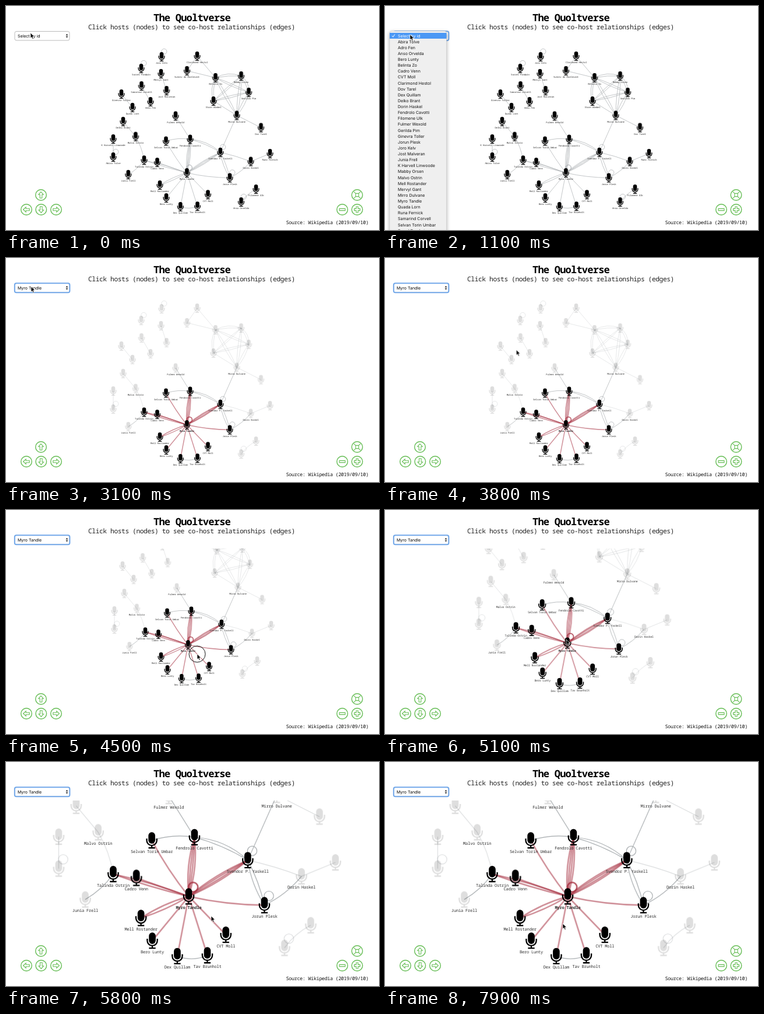
An HTML page that plays this animation: 640 px wide and 384 px high, repeating every 8 s.

```html
<!DOCTYPE html>
<html lang="en">
<head>
<meta charset="utf-8">
<title>The Quoltverse</title>
<style>
html, body { margin: 0; height: 100%; overflow: hidden; background: #fff; }
svg { display: block; width: 100vw; height: 100vh; }
text { text-rendering: geometricPrecision; }
.mono { font-family: "Noto Sans Mono", monospace; }
.ui { font: 7px Inter, sans-serif; }

.far, .far-edge, .far-label, .red, .chosen, .menu, .slide, .ring, .before, .after, .cursor, .press {
  animation: 8s step-end infinite;
}

/* graph */
.edge { fill: none; stroke: #a3a8ab; stroke-width: .65; }
.label { font-size: 4px; letter-spacing: -.13px; text-anchor: middle; fill: #303030; }
.far { animation-name: fade; --to: .13; }
.far-edge { animation-name: fade; --to: .4; }
.far-label { animation-name: fade; --to: 0; }
.red { animation-name: redden; }
.chosen { animation-name: bolden; }
@keyframes fade { 0% { opacity: 1 } 35%, 100% { opacity: var(--to) } }
@keyframes redden {
  0% { stroke: #a3a8ab; stroke-width: .65 }
  35%, 100% { stroke: rgba(165, 45, 62, .53); stroke-width: 1.45 }
}
@keyframes bolden { 0% { font-weight: 400 } 35%, 100% { font-weight: 700 } }
.view { transform-box: view-box; transform-origin: 310.4px 286px; animation: view 8s linear infinite; }
@keyframes view {
  0%, 51.25% { transform: translate(0, 0) scale(1) }
  56.25%, 59.4% { transform: translate(2px, -55px) scale(1) }
  63.75% { transform: translate(2.4px, -58px) scale(1.2) }
  68.75%, 100% { transform: translate(3.1px, -55.6px) scale(1.765) }
}

/* select and menu */
.ring { animation-name: show; fill: none; stroke: #74a9ea; stroke-width: 2; }
@keyframes show { 0% { opacity: 0 } 12.5%, 100% { opacity: 1 } }
.before { animation-name: before; }
.after { animation-name: after; }
@keyframes before { 0% { opacity: 1 } 33.75%, 100% { opacity: 0 } }
@keyframes after { 0% { opacity: 0 } 33.75%, 100% { opacity: 1 } }
.menu { animation-name: menu; }
@keyframes menu {
  0% { opacity: 0 }
  12.5% { opacity: 1 }
  33.75% { opacity: 1; animation-timing-function: linear }
  35.5%, 100% { opacity: 0 }
}
.panel { fill: #efefef; stroke: #c4c4c4; stroke-width: .5; filter: drop-shadow(0 2px 3px #0005); }
.slide { animation-name: slide; --dir: 1; }
.back { --dir: -1; }
@keyframes slide {
  0% { transform: translateY(0) }
  18.75% { transform: translateY(calc(var(--dir) * 10.125px)) }
  22.5% { transform: translateY(calc(var(--dir) * 10.125px)); animation-timing-function: steps(27) }
  31%, 100% { transform: translateY(calc(var(--dir) * 283.5px)) }
}

/* pointer */
.cursor { animation-name: move; animation-timing-function: linear; }
@keyframes move {
  0%, 5% { transform: translate(42px, 46px) }
  7.5%, 43.75% { transform: translate(43px, 49px) }
  47.5% { transform: translate(225px, 157px) }
  51.25% { transform: translate(326px, 302px) }
  56.25%, 57.5% { transform: translate(328px, 247px) }
  62%, 68.75% { transform: translate(311px, 222px) }
  72.5%, 77.5% { transform: translate(352px, 264px) }
  85%, 87.5% { transform: translate(330px, 250px) }
  96.25%, 98.7% { transform: translate(245px, 230px) }
  98.75%, 100% { transform: translate(305px, 277px) }
}
.press { animation-name: press; fill: none; stroke: #111; }
@keyframes press { 0% { opacity: 0 } 51.25% { opacity: 1 } 57.5%, 100% { opacity: 0 } }
</style>
</head>
<body>
<svg viewBox="0 0 640 384">
  <defs>
    <clipPath id="canvas"><rect y="66" width="640" height="318"/></clipPath>
    <clipPath id="row"><rect x="8" y="46" width="97.5" height="10"/></clipPath>
    <g id="mic">
      <rect x="-3.3" y="-8" width="6.6" height="11.2" rx="3.3"/>
      <path d="M-4.9-1.8V0A4.9 4.9 0 0 0 4.9 0V-1.8M0 5V7M-3.2 7.3H3.2" fill="none" stroke="#000" stroke-width="1.3"/>
    </g>
    <path id="arrow" d="M0-5.4L4.2-.8H1.8V5.2H-1.8V-.8H-4.2Z"/>
    <path id="minus" d="M-5-1.6H5V1.6H-5Z"/>
    <path id="plus" d="M-1.6-5h3.2v3.4h3.4v3.2h-3.4v3.4h-3.2v-3.4h-3.4v-3.2h3.4z"/>
    <path id="extent" d="M-2.6-2.6H2.6V2.6H-2.6ZM-2.6-2.6L-5.6-5.6M2.6-2.6L5.6-5.6M2.6 2.6L5.6 5.6M-2.6 2.6L-5.6 5.6"/>
    <g id="list"><path d="M12 51l1.8 2.2 3-4.6" fill="none" stroke="currentColor"/></g>
  </defs>

  <g clip-path="url(#canvas)"><g class="view mono" id="graph"></g></g>
  <g id="buttons" fill="#fff" stroke="#66bd55" stroke-width="1.1"></g>

  <g class="mono" fill="#000">
    <text x="319" y="26" font-size="17" font-weight="700" letter-spacing="-.77" text-anchor="middle">The Quoltverse</text>
    <text x="318.5" y="40" font-size="11.3" letter-spacing="-.44" text-anchor="middle" fill="#222">Click hosts (nodes) to see co-host relationships (edges)</text>
    <text x="622" y="373.5" font-size="8.4" letter-spacing="-.31" text-anchor="end" fill="#111">Source: Wikipedia (2019/09/10)</text>
  </g>

  <g class="ui">
    <rect x="15" y="43.5" width="94" height="15.5" rx="3" fill="#fff" stroke="#aaa" stroke-width=".8"/>
    <rect class="ring" x="14.8" y="43.3" width="94.6" height="16" rx="3"/>
    <text class="before" x="20" y="53.7">Select by id</text>
    <text class="after" x="20" y="53.7">Myro Tandle</text>
    <path d="M102.6 50.4l1.9-2.6 1.9 2.6zM102.6 52l1.9 2.6 1.9-2.6z" fill="#222"/>
  </g>

  <g class="menu ui">
    <rect class="panel" x="8" y="43" width="97.5" height="400" rx="3.5"/>
    <use href="#list" color="#111" fill="#111"/>
    <g class="slide"><g clip-path="url(#row)">
      <rect x="8" y="46" width="97.5" height="10" fill="#4b98f5"/>
      <g class="slide back"><use href="#list" color="#fff" fill="#fff"/></g>
    </g></g>
  </g>

  <g class="cursor">
    <circle class="press" r="14"/>
    <path d="M0 0V9.2L2.1 7.2 3.6 10.6 5.2 9.9 3.7 6.6H6.6Z" fill="#000" stroke="#fff" stroke-width=".7"/>
  </g>
</svg>

<script>
// name, x, y; each trailing "o" is a self loop
const hosts = `Abira Tolve 184 259 o
Adro Fen 248 164
Anso Orvelda 403.5 336 o
Bero Lunty 275 329
Belinta Zo 359.5 123
Cadro Venn 259.5 268
CVT Moll 346.5 323.3
Clarimond Hestol 328 86
Dov Tarel 437.5 208.5
Dex Quillam 299.3 344
Delko Brant 201 198
Dorin Haskel 420 266.5
Fendrolo Cavotti 316 228.5
Filomene Ulk 429 314
Fulmer Wexold 291 188.5
Gerilda Pim 416.5 148
Ginevra Toller 198 151
Jorun Plesk 384 294.5 o
Joro Kelv 267 87 o
Jost Malveran 275.5 145
Junia Frell 209.8 289
K Harvell Linwoode 184 228
Mabby Orsen 403.5 120
Malvo Ostrin 222.4 223.7
Mell Rostander 264 307
Mervyl Gant 266 116
Mirro Dulvane 396 187.5
Myro Tandle 310.4 286 oo
Quada Lorn 217 174
Runa Fernick 453 253
Samarind Corvell 232.5 137
Selvan Torin Umbar 274.5 231.6
Sorrel Pandwin 232 107 o
Sunniv de Marlevant 310.5 111
Svendor P. Yaskell 367.8 250.8 o
Storn Wimbel 356 163
Talinda Ostrin 237 264.3
Tav Brunholt 328.5 343.2`.split("\n").map(line => {
  const [, name, x, y, loops] = line.match(/^(.+) ([\d.]+) ([\d.]+) ?(o*)$/);
  return { name, key: name.split(" ")[0], x: +x, y: +y, loops: loops.length };
});

// two hosts, then the bow of each edge between them
const links = `Clarimond Sunniv 0
Clarimond Belinta 0
Sunniv Belinta 0
Mervyl Jost 0
Samarind Adro 0
Ginevra Quada 0
Delko Malvo 0
Malvo Talinda -4
K Abira 0
Talinda Junia -4
Myro Talinda -2 3
Myro Cadro 0
Myro Mell -3 4
Myro Bero 0
Myro Dex 0
Myro Tav 0
Dex Tav 6
Myro CVT 0
Myro Jorun 4
Myro Svendor -5 -2 2 5
Myro Fendrolo -6 -2 2 6
Myro Selvan -3
Selvan Fendrolo -5
Fendrolo Fulmer 0
Fendrolo Svendor -4 -10
Svendor Mirro 0
Svendor Jorun 5 -3
Dorin Svendor 2
Jorun Dorin 5
Dorin Runa 0
Mirro Dov 0
Mirro Belinta -5 4
Mirro Mabby -4 5
Mirro Gerilda -3 6
Mirro Storn 0
Belinta Mabby -10 -3
Belinta Gerilda -3 4
Belinta Storn 9 3
Mabby Gerilda -9 -2
Mabby Storn -3 3
Storn Gerilda -4 3
Filomene Anso 4`.split("\n").map(line => {
  const [a, b, ...bows] = line.split(" ");
  return { a, b, bows: bows.map(Number) };
});

const byId = id => document.getElementById(id);
const byKey = Object.fromEntries(hosts.map(h => [h.key, h]));

function add(parent, tag, attrs, text) {
  const el = document.createElementNS("http://www.w3.org/2000/svg", tag);
  for (const name in attrs) el.setAttribute(name, attrs[name]);
  if (text) el.textContent = text;
  return parent.appendChild(el);
}

function neighbours(keys) {
  const found = new Set(keys);
  for (const { a, b } of links) {
    if (keys.has(a)) found.add(b);
    if (keys.has(b)) found.add(a);
  }
  return found;
}

const chosen = "Myro";
const near = neighbours(new Set([chosen]));
const labelled = neighbours(near);
const graph = byId("graph");

const edgeClass = from => "edge" + (from === chosen ? " red" : near.has(from) ? "" : " far-edge");

for (const { a, b, bows } of links) {
  const p = byKey[a], q = byKey[b];
  const dx = q.x - p.x, dy = q.y - p.y, length = Math.hypot(dx, dy);
  for (const bow of bows) {
    const cx = (p.x + q.x) / 2 - dy / length * bow;
    const cy = (p.y + q.y) / 2 + dx / length * bow;
    add(graph, "path", { class: edgeClass(a), d: `M${p.x} ${p.y}Q${cx} ${cy} ${q.x} ${q.y}` });
  }
}

for (const { key, x, y, loops } of hosts)
  for (let i = 0; i < loops; i++)
    add(graph, "circle", { class: edgeClass(key), cx: x + 4.3, cy: y - 9, r: 4.6 });

for (const { name, key, x, y } of hosts) {
  add(graph, "use", { href: "#mic", x, y, class: near.has(key) ? "" : "far" });
  const state = key === chosen ? "chosen" : labelled.has(key) ? "" : "far-label";
  add(graph, "text", { class: "label " + state, x, y: y + 12.2 }, name);
}

["Select by id", ...hosts.map(h => h.name)].forEach((name, i) =>
  add(byId("list"), "text", { x: 22, y: 53.5 + i * 10.125 }, name));

function button(icon, x, y, turn = 0) {
  const g = add(byId("buttons"), "g", { transform: `translate(${x} ${y}) rotate(${turn})` });
  add(g, "circle", { r: 9.3, "stroke-width": 1.4 });
  add(g, "use", { href: "#" + icon });
}
button("arrow", 60, 324);
button("arrow", 35, 349, -90);
button("arrow", 60.3, 349, 180);
button("arrow", 86, 349, 90);
button("minus", 577, 349);
button("plus", 602.5, 349);
button("extent", 602.5, 324);
</script>
</body>
</html>
```
